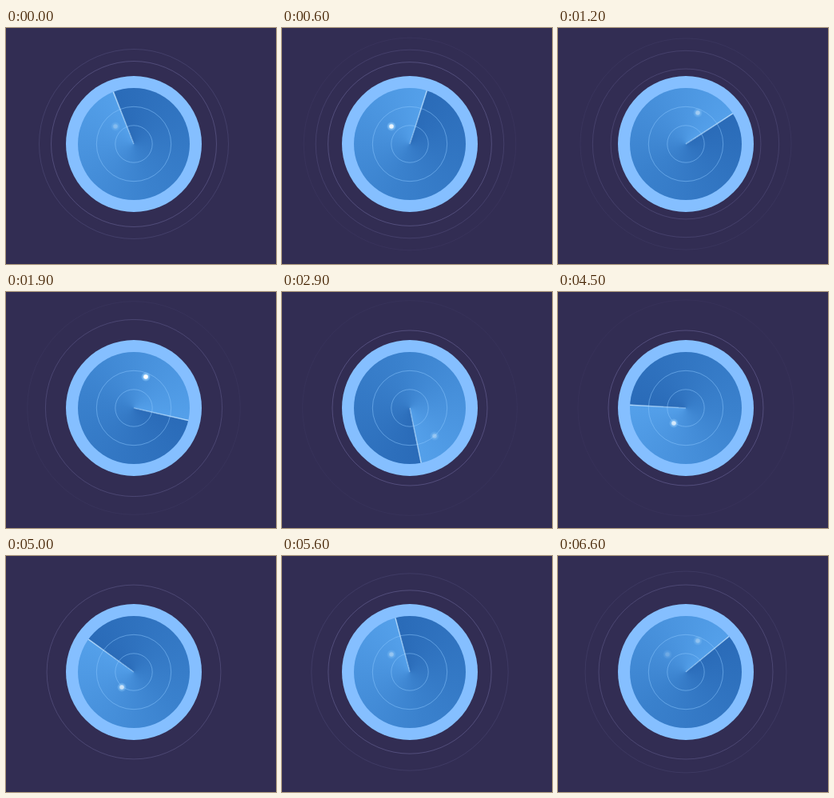
An HTML page with a canvas for the animation above (6700 ms loop, 338 px wide and 295 px high).

```html
<!DOCTYPE html>
<html lang="en">
<head>
<meta charset="utf-8">
<title>Radar</title>
<style>
  html, body { margin: 0; width: 100%; height: 100%; overflow: hidden; background: #322d53; }
  canvas { display: block; width: 338px; height: 295px; }
</style>
</head>
<body>
<canvas id="radar"></canvas>
<script>
const W = 338, H = 295, CX = 160, CY = 145;
const LOOP = 6700, STEP = 100, TURN = 5500;
const START = 338.5; // sweep heading at time zero, degrees clockwise from north
const RIM = 85, DISC = 70, SPEED = 0.0238, LIFE = 2400;

// Times at which a pulse leaves the rim
const pulses = [-1408, -777, -130, 825, 2396, 3996, 4880, 5592];
const blips = [[137, 123], [175, 106], [191, 180], [145, 164]];

const canvas = document.getElementById('radar');
const ctx = canvas.getContext('2d');
const dpr = window.devicePixelRatio || 1;
canvas.width = W * dpr;
canvas.height = H * dpr;

const rad = deg => deg * Math.PI / 180;
const clamp = x => Math.max(0, Math.min(1, x));
const ramp = (x, a, b) => clamp((x - a) / (b - a));

function circle(x, y, r) {
  ctx.beginPath();
  ctx.arc(x, y, r, 0, Math.PI * 2);
}

function fillCircle(x, y, r, style) {
  circle(x, y, r);
  ctx.fillStyle = style;
  ctx.fill();
}

function ring(r, style) {
  circle(CX, CY, r);
  ctx.strokeStyle = style;
  ctx.lineWidth = 1;
  ctx.stroke();
}

function drawPulses(t) {
  for (const born of pulses) {
    const age = t - born;
    if (age <= 0 || age >= LIFE) continue;
    const alpha = 0.42 * ramp(age, 150, 550) * Math.pow(1 - age / LIFE, 1.15);
    ring(RIM + age * SPEED, `rgba(165,160,225,${alpha})`);
  }
}

function drawDisc(heading) {
  const angle = rad(heading - 90);
  fillCircle(CX, CY, RIM, '#85bfff');

  const glow = ctx.createConicGradient(angle, CX, CY);
  glow.addColorStop(0, '#2a6bb8');
  glow.addColorStop(0.5, '#3a81cd');
  glow.addColorStop(1, '#54a0ea');
  fillCircle(CX, CY, DISC, glow);

  ring(23.2, 'rgba(140,200,255,0.5)');
  ring(46.7, 'rgba(140,200,255,0.5)');

  const x = CX + DISC * Math.cos(angle), y = CY + DISC * Math.sin(angle);
  const beam = ctx.createLinearGradient(CX, CY, x, y);
  beam.addColorStop(0, 'rgba(190,225,255,0.45)');
  beam.addColorStop(1, 'rgba(190,225,255,0.85)');
  ctx.beginPath();
  ctx.moveTo(CX, CY);
  ctx.lineTo(x, y);
  ctx.strokeStyle = beam;
  ctx.lineWidth = 1.5;
  ctx.stroke();
}

function drawBlip([x, y], heading) {
  const bearing = Math.atan2(x - CX, CY - y) * 180 / Math.PI;
  const age = ((heading - bearing + 720) % 360) / 360 * TURN;
  const power = ramp(age, 0, 1100) * (1 - ramp(age, 1250, 1560));
  if (!power) return;
  const halo = ctx.createRadialGradient(x, y, 1, x, y, 6);
  halo.addColorStop(0, `rgba(185,225,255,${0.75 * power})`);
  halo.addColorStop(0.6, `rgba(150,208,255,${0.6 * power})`);
  halo.addColorStop(1, 'rgba(150,208,255,0)');
  fillCircle(x, y, 6, halo);
  fillCircle(x, y, 2.8, `rgba(255,255,255,${Math.pow(power, 1.6)})`);
}

function draw(t) {
  const heading = (START + t / TURN * 360) % 360;
  ctx.setTransform(dpr, 0, 0, dpr, 0, 0);
  ctx.fillStyle = '#322d53';
  ctx.fillRect(0, 0, W, H);
  drawPulses(t);
  drawDisc(heading);
  blips.forEach(b => drawBlip(b, heading));
}

const began = performance.now();

function tick() {
  const t = (performance.now() - began) % LOOP;
  draw(Math.floor(t / STEP) * STEP);
  requestAnimationFrame(tick);
}

tick();
</script>
</body>
</html>
```
